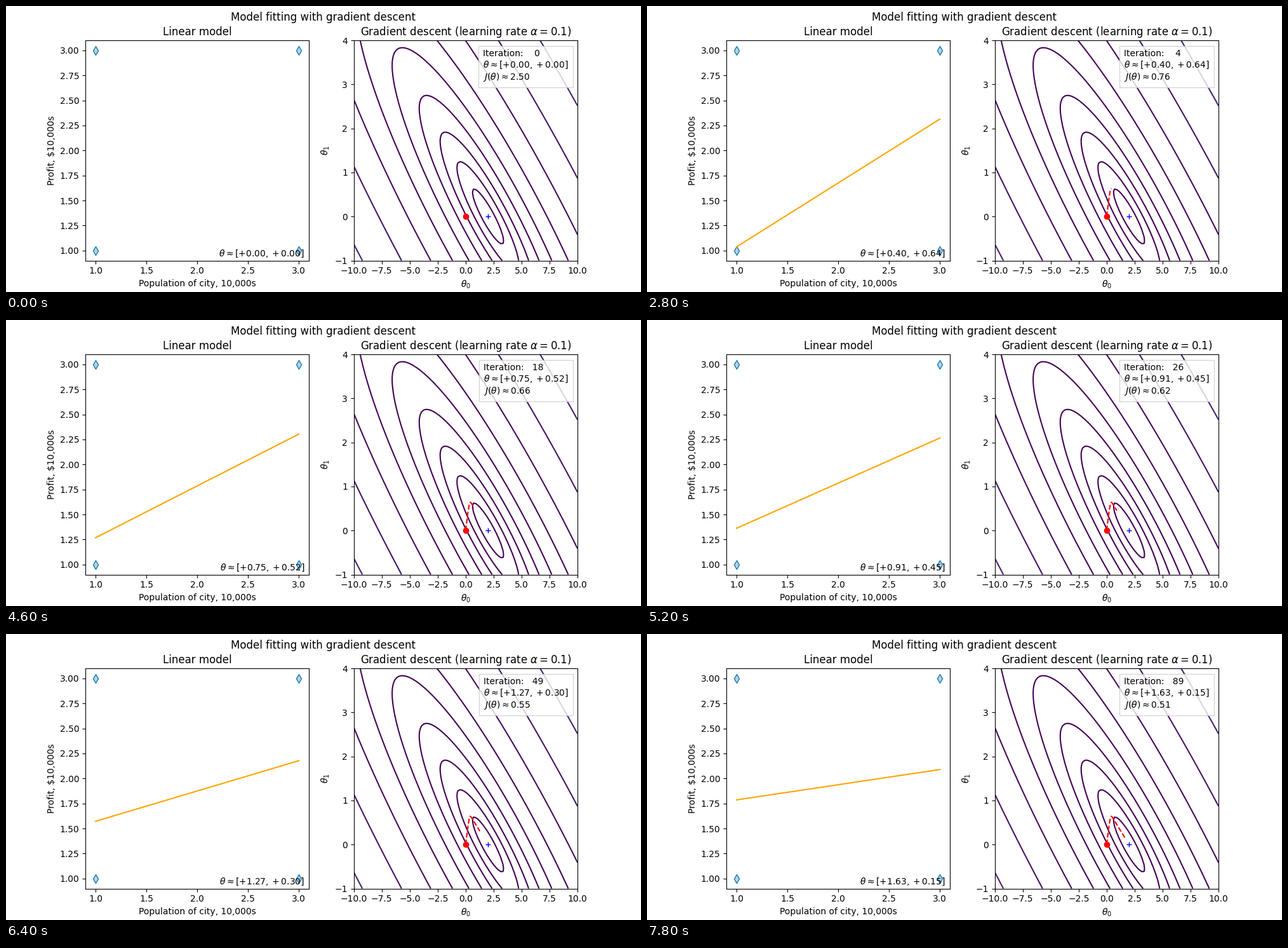
Recreate the animation shown at these times as a matplotlib script. Size 1000 by 450 pixels, loop 8 s.

```python
import numpy as np
import matplotlib.pyplot as plt
from matplotlib.animation import FuncAnimation

FRAMES, INTERVAL = 40, 200
ALPHA = 0.1
GROWTH = 0.001499  # iterations grow with the cube of the frame number

x = np.array([1, 1, 3, 3])
y = np.array([1, 3, 1, 3])


def cost(t0, t1):
    return sum((t0 + t1 * a - b) ** 2 for a, b in zip(x, y)) / (2 * len(x))


def descend(steps):
    X = np.column_stack([np.ones(len(x)), x])
    path = [np.zeros(2)]
    for _ in range(steps):
        theta = path[-1]
        path.append(theta - ALPHA * X.T @ (X @ theta - y) / len(x))
    return np.array(path)


def iteration(frame):
    return round(GROWTH * frame ** 3)


path = descend(iteration(FRAMES))

fig, (left, right) = plt.subplots(1, 2, figsize=(10, 4.5), dpi=100)
fig.suptitle("Model fitting with gradient descent")

left.set_title("Linear model")
left.set_xlabel("Population of city, 10,000s")
left.set_ylabel("Profit, $10,000s")
left.plot(x, y, "d", ms=7, mfc="lightblue", mec="C0")
left.set(xlim=(0.9, 3.1), ylim=(0.9, 3.1))
fit, = left.plot([], [], color="orange")
theta_text = left.text(0.98, 0.02, "", ha="right", transform=left.transAxes)

right.set_title(rf"Gradient descent (learning rate $\alpha = {ALPHA}$)")
right.set_xlabel(r"$\theta_0$")
right.set_ylabel(r"$\theta_1$")
t0, t1 = np.meshgrid(np.linspace(-10, 10, 100), np.linspace(-1, 4, 100))
right.contour(t0, t1, cost(t0, t1), levels=np.logspace(-2, 3, 20))
right.plot(2, 0, "b+")
right.plot(0, 0, "ro")
trail, = right.plot([], [], "r--")
info = right.text(
    0.96, 0.96, "", ha="right", va="top", ma="left", transform=right.transAxes,
    bbox=dict(boxstyle="square,pad=0.5", fc="white", ec="0.8", alpha=0.8))


def update(frame):
    n = iteration(frame)
    a, b = path[n]
    theta = rf"$\theta \approx [{a:+.2f}, {b:+.2f}]$"
    ends = np.array([1, 3])
    fit.set_data(ends, a + b * ends)
    trail.set_data(*path[:n + 1].T)
    theta_text.set_text(theta)
    info.set_text(f"Iteration: {n:4d}\n{theta}\n"
                  rf"$J(\theta) \approx {cost(a, b):.2f}$")
    return fit, trail, theta_text, info


anim = FuncAnimation(fig, update, frames=FRAMES, interval=INTERVAL, repeat=True)
plt.show()
```
